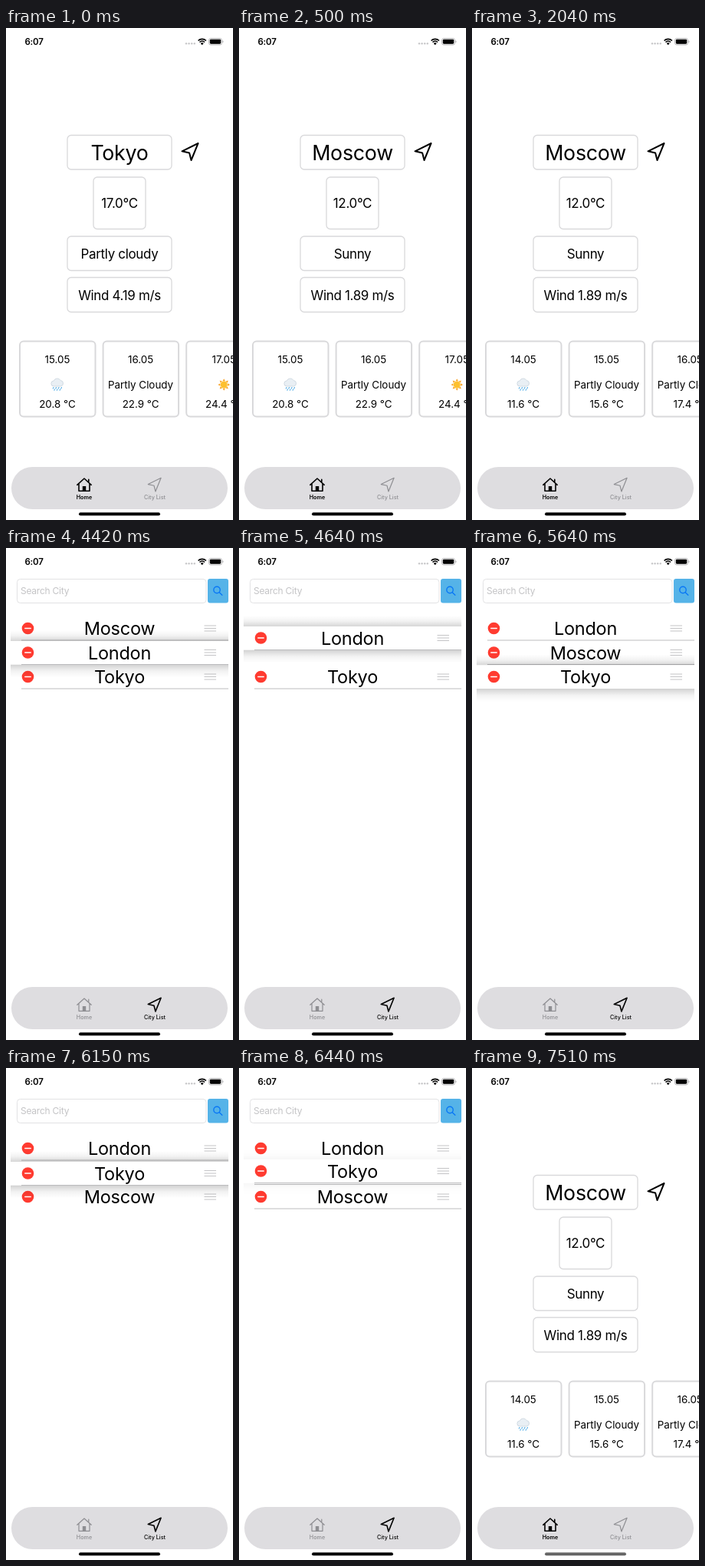
Recreate the animation shown at these times as an HTML page. Size 296x640 px, loop 8000 ms.

```html
<!DOCTYPE html>
<html lang="en">
<head>
<meta charset="utf-8">
<title>Weather app</title>
<style>
  html, body { margin: 0; width: 100%; height: 100%; overflow: hidden; background: #fff; }
  svg { display: block; width: 296px; height: 640px; }
  text { font-family: Inter, "Liberation Sans", sans-serif; font-optical-sizing: none; text-anchor: middle; }
  .title { letter-spacing: -.01em; }
  .info { letter-spacing: -.02em; }
  .line { fill: none; stroke-linecap: round; stroke-linejoin: round; }
  .box { fill: #fff; stroke: #d9d9db; }
  .rule { stroke: #bcbcbe; }
</style>
</head>
<body>
<svg id="stage" viewBox="0 0 296 640"></svg>
<script>
const LOOP = 8000, LIST_IN = 4420, LIST_OUT = 7510;
const stage = document.getElementById('stage');

// Text whose capitals are centred on cy
const text = (x, cy, size, str, attrs = '') =>
  `<text x="${x}" y="${cy + size * .364}" font-size="${size}" ${attrs}>${str}</text>`;
const box = (x, y, w, h, stroke = 1.3) =>
  `<rect class="box" x="${x}" y="${y}" width="${w}" height="${h}" rx="5" stroke-width="${stroke}"/>`;
const rule = (y, attrs = '') => `<path class="rule" d="M20 ${y}H290" ${attrs}/>`;
const arrow = (x, y, scale, width, color) =>
  `<path class="line" transform="translate(${x} ${y}) scale(${scale})" stroke="${color}"
    stroke-width="${width / scale}" d="M22 1L1 11.3L10.6 13.4L13 23Z"/>`;

const rain = x => `<g transform="translate(${x} 464)">
  <path d="M-4.500 2a3.500 3.500 0 0 1-.3-7a5 5 0 0 1 9-.5a3.800 3.800 0 0 1 .3 7.500z"
    fill="#e9eff4" stroke="#c3cfd8" stroke-width=".7"/>
  <path class="line" stroke="#54aee6" stroke-width="1.1"
    d="M-5 3.500l-.7 1.500M-1.500 3.500l-.7 1.500M2 3.500l-.7 1.500M5.500 3.500l-.7 1.500M-3.500 6l-.6 1.300M0 6l-.6 1.300M3.700 6l-.6 1.300"/></g>`;

const sun = x => {
  let rays = '';
  for (let a = 0; a < 360; a += 45) rays += `<path d="M-1.700-4.800L0-7.800L1.700-4.800Z" transform="rotate(${a})"/>`;
  return `<g transform="translate(${x} 464)" fill="#f9a62b">${rays}<circle r="4.500" fill="#fdc02f"/></g>`;
};

const cloudy = x => text(x, 464, 13.4, 'Partly Cloudy');

const card = (x, [date, sky, temp]) =>
  box(x - 49, 407.5, 98.5, 98, 2) + text(x, 431, 13.4, date) + sky(x) + text(x, 489.5, 13.4, temp + ' °C');

const cards = days => days.map((day, i) => card(67 + i * 108.6, day)).join('');

const tokyoDays = [['15.05', rain, '20.8'], ['16.05', cloudy, '22.9'], ['17.05', sun, '24.4']];
const moscowDays = [['14.05', rain, '11.6'], ['15.05', cloudy, '15.6'], ['16.05', cloudy, '17.4']];

const current = (city, temp, sky, wind) =>
  text(148, 162, 26.8, city, 'class="title"') +
  text(148, 228, 17, temp + '°C', 'class="info"') +
  text(148, 294, 17, sky, 'class="info"') +
  text(148, 348, 17, `Wind ${wind} m/s`, 'class="info"');

const home = t =>
  box(80, 139.5, 136, 44.5) + box(114, 194, 68, 67.5) + box(80, 271, 136, 44.5) + box(80, 324.5, 136, 45) +
  arrow(228.5, 149, 1, 2, '#000') +
  (t < 500 ? current('Tokyo', '17.0', 'Partly cloudy', '4.19') : current('Moscow', '12.0', 'Sunny', '1.89')) +
  cards(t < 2040 ? tokyoDays : moscowDays);

// Drag steps: time, row centres of Moscow, London, Tokyo, dragged row, shadow strength
const names = ['Moscow', 'London', 'Tokyo'];
const steps = [
  [4420, 104.5, 136, 167.5, 1, 1],
  [4530, 104.5, 129, 167.5, 1, 1],
  [4640, 112, 117, 167.5, 1, 1],
  [4750, 128, 107, 167.5, 1, 1],
  [4860, 133, 102, 167.5, 1, 1],
  [5640, 136, 104.5, 167.5, 2, 1],
  [5870, 136, 104.5, 158, 2, 1],
  [5980, 167.5, 104.5, 144, 2, 1],
  [6150, 167.5, 104.5, 137, 2, 1],
  [6320, 167.5, 104.5, 133.5, 2, .6],
  [6440, 167.5, 104.5, 134, 2, .2]
];

const row = (name, y, shadow) => `<g transform="translate(0 ${y})">` +
  (shadow ? `<g opacity="${shadow}">
    <rect x="6" y="-29" width="284" height="14" fill="url(#above)"/>
    <rect x="6" y="15.500" width="284" height="17" fill="url(#below)"/></g>
    <rect x="6" y="-15" width="284" height="30.500" fill="#fff"/>` : '') +
  `<circle cx="28.500" r="7.800" fill="#ff3b30"/>
  <path class="line" d="M24.800 0H32.200" stroke="#fff" stroke-width="1.500"/>
  <path d="M258.500-3.500H274M258.500 0H274M258.500 3.500H274" stroke="#c4c4c6" stroke-width="1.200"/>` +
  text(148, 0, 23.5, name, 'class="title"') +
  (y < 160 ? rule(15.5) : '') + '</g>';

const list = t => {
  const [, ...step] = steps.filter(s => s[0] <= t).pop();
  const dragged = step[3];
  const order = [0, 1, 2].filter(i => i !== dragged).concat(dragged);
  return `<rect x="14.500" y="40.500" width="246.500" height="31" rx="4" fill="#fff" stroke="#e2e2e4"/>` +
    text(19, 56, 12, 'Search City', 'class="info" fill="#c4c4c6" style="text-anchor:start"') +
    `<rect x="263" y="40" width="27" height="31.500" rx="3" fill="#55b3e8"/>
    <g class="line" stroke="#0a78f5" stroke-width="1.400"><circle cx="275" cy="54.500" r="4.200"/><path d="M278.200 57.700L281.800 61.300"/></g>
    <g clip-path="url(#rows)">` +
    (t >= 5980 ? rule(151.5) : '') +
    (t < 5640 || t >= 6320 ? rule(183) : '') +
    order.map(i => row(names[i], step[i], i === dragged ? step[4] : 0)).join('') + '</g>';
};

const statusBar = text(36.5, 18, 11.5, '6:07', 'font-weight="600" class="info"') +
  [235, 238.6, 242.2, 245.8].map(x => `<circle cx="${x}" cy="20.300" r="1.200" fill="#c8c8ca"/>`).join('') +
  `<g class="line" stroke="#000" stroke-width="1.700" style="stroke-linecap:butt">
    <path d="M250.600 16.500A7.200 7.200 0 0 1 260.900 16.500M252.500 18.500A4.600 4.600 0 0 1 259 18.500"/></g>
  <path d="M253.800 20a2.900 2.900 0 0 1 3.900 0L255.750 22.200Z"/>
  <rect x="264.500" y="13.500" width="17" height="8.500" rx="2.500" fill="none" stroke="#a9a9ab" stroke-width=".8"/>
  <rect x="265.800" y="14.800" width="14.400" height="5.900" rx="1.400"/>
  <path d="M282.500 16.300a1.600 1.600 0 0 1 0 3z" fill="#a9a9ab"/>`;

const tabBar = (onList, indicator) => {
  const [homeColor, listColor] = onList ? ['#8e8e92', '#000'] : ['#000', '#8e8e92'];
  return `<rect x="7" y="571" width="282" height="55" rx="27.500" fill="#dedde0"/>
    <g class="line" stroke="${homeColor}" stroke-width="${onList ? 1.2 : 1.6}">
      <path d="M92.800 594.300L102 586L111.200 594.300M95 593V602.300H109V593M107.800 590.500V587.200"/></g>
    <rect x="99.800" y="596" width="4.400" height="6.300" fill="${homeColor}"/>` +
    arrow(184.5, 584.5, .8, onList ? 1.6 : 1.2, listColor) +
    text(102, 610.3, 7.2, 'Home', `fill="${homeColor}" font-weight="${onList ? 500 : 600}"`) +
    text(194, 610.3, 7.2, 'City List', `fill="${listColor}" font-weight="500"`) +
    `<rect x="95" y="630.300" width="106" height="4" rx="2" fill="${indicator}"/>`;
};

const fade = (id, from, to) => `<linearGradient id="${id}" x2="0" y2="1">
  <stop stop-opacity="${from}"/><stop offset=".5" stop-opacity=".05"/><stop offset="1" stop-opacity="${to}"/></linearGradient>`;
const defs = `<defs>${fade('above', 0, .16)}${fade('below', .18, 0)}
  <clipPath id="rows"><rect x="6" y="88" width="284" height="480"/></clipPath></defs>`;

let shown = '';
function draw() {
  const t = performance.now() % LOOP;
  const onList = t >= LIST_IN && t < LIST_OUT;
  const view = defs + statusBar + (onList ? list(t) : home(t)) + tabBar(onList, t >= LIST_OUT ? '#666' : '#000');
  if (view !== shown) stage.innerHTML = shown = view;
  requestAnimationFrame(draw);
}
draw();
</script>
</body>
</html>
```
